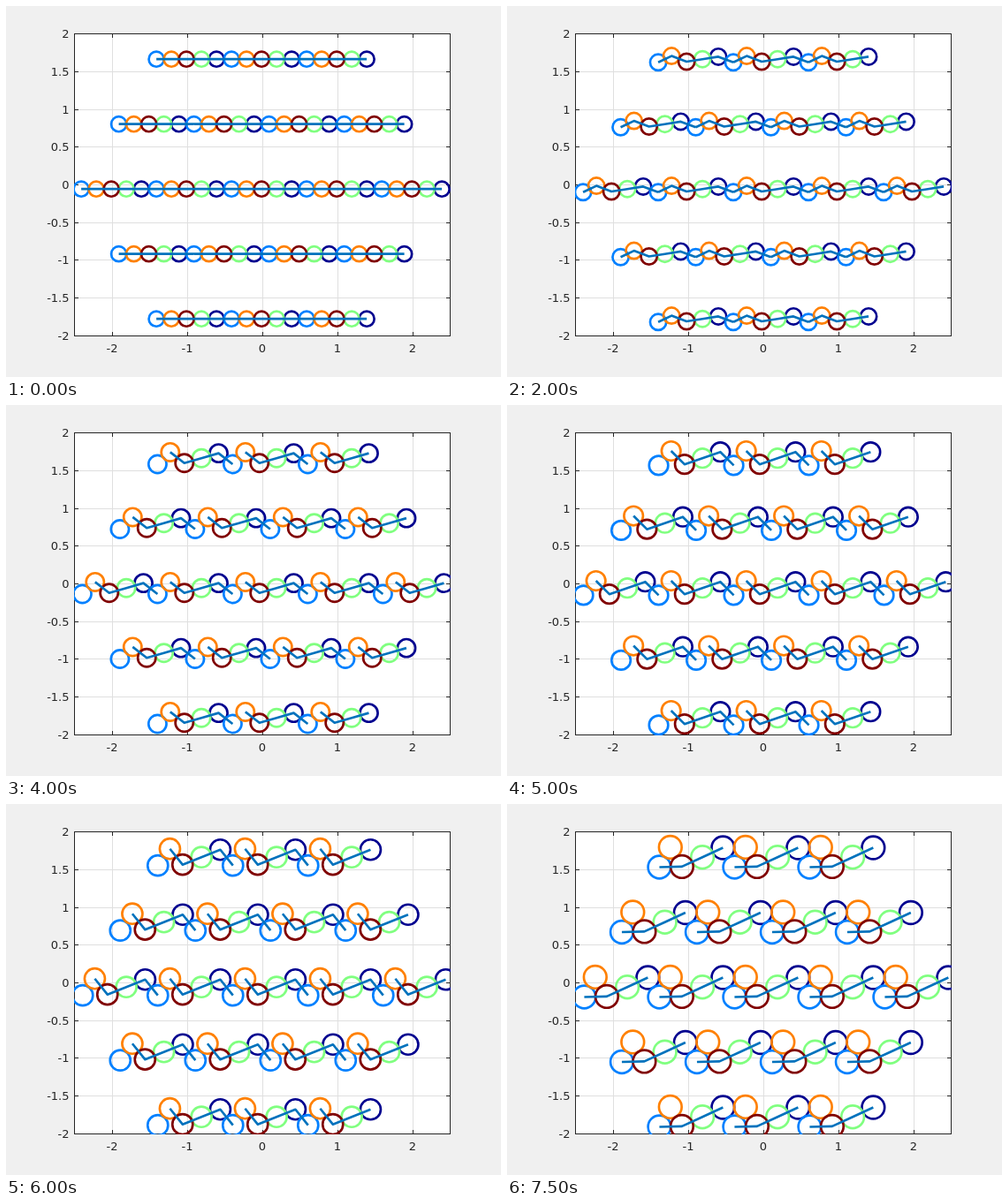
Animation, 560 px wide and 420 px high, one loop 8 s. Source, as an HTML page:

```html
<!DOCTYPE html>
<html lang="en">
<head>
<meta charset="utf-8">
<title>Swelling disk chains</title>
<style>
  html, body { margin: 0; width: 100%; height: 100%; overflow: hidden; background: #f0f0f0; }
  svg { display: block; width: 560px; height: 420px; }
  text { font: 13px "DejaVu Sans", sans-serif; fill: #262626; }
</style>
</head>
<body>
<svg id="stage" viewBox="0 0 560 420">
  <defs>
    <clipPath id="plot"><rect x="77" y="31" width="426" height="343"/></clipPath>
  </defs>
  <rect width="560" height="420" fill="#f0f0f0"/>
  <rect x="77.5" y="31.5" width="425" height="342" fill="#fff"/>
  <g id="axes" fill="none"></g>
  <g clip-path="url(#plot)" fill="none" stroke-width="2.67">
    <g id="disks"></g>
    <path id="links" stroke="#0072bd" stroke-linejoin="round"/>
  </g>
</svg>
<script>
const STEP = 500, STEPS = 16, CELL = 85;
const ROW_CELLS = [3, 4, 5, 4, 3];
// Listed in painting order.
const COLORS = {
  navy: '#00008f', blue: '#0080ff', green: '#80ff80', orange: '#ff8000', red: '#800000'
};
const byId = id => document.getElementById(id);

function add(parent, tag, attrs, label) {
  const node = document.createElementNS('http://www.w3.org/2000/svg', tag);
  for (const name in attrs) node.setAttribute(name, attrs[name]);
  if (label !== undefined) node.textContent = label;
  parent.appendChild(node);
  return node;
}

function drawAxes() {
  const axes = byId('axes');
  let grid = '', ticks = '';
  for (let v = -2; v <= 2; v++) {
    const x = 290 + v * 85 + 0.5;
    grid += `M${x} 32V373`;
    ticks += `M${x} 373v-4M${x} 32v4`;
    add(axes, 'text', { x: x - 0.5, y: 392, 'text-anchor': 'middle' }, v);
  }
  for (let v = -2; v <= 2; v += 0.5) {
    const y = Math.floor(202.5 - v * 85.4) + 0.5;
    grid += `M78 ${y}H502`;
    ticks += `M78 ${y}h4M502 ${y}h-4`;
    add(axes, 'text', { x: 71.5, y: y + 4.5, 'text-anchor': 'end' }, v);
  }
  add(axes, 'path', { d: grid, stroke: '#dfdfdf' });
  add(axes, 'path', { d: ticks, stroke: '#262626' });
  add(axes, 'rect', { x: 77.5, y: 31.5, width: 425, height: 342, stroke: '#262626' });
}

const cells = [];
ROW_CELLS.forEach((count, row) => {
  for (let i = 0; i < count; i++) {
    cells.push({
      x: 290.6 + (i - count / 2) * CELL + 58 - 0.5 * CELL + 42.5,
      y: 60.2 + 73.5 * row,
      last: i === count - 1
    });
  }
});
// Green disk sits 0.685 cells into the chain.
cells.forEach(cell => { cell.x -= 0.0; });

const disks = [];
for (const name in COLORS) {
  for (const cell of cells) {
    disks.push({ name, cell, node: add(byId('disks'), 'circle', { stroke: COLORS[name] }) });
  }
}

const polar = (from, length, degrees) => {
  const a = degrees * Math.PI / 180;
  return { x: from.x + length * Math.cos(a), y: from.y + length * Math.sin(a) };
};

// Disk centres relative to the green one; neighbours stay in touch as they swell.
function pose(k) {
  const size = 17 + 0.19 * k + 0.0255 * k * k;
  const tilt = (2.4 - 0.05 * k) * k;
  const fold = (5.6 - 0.11 * k) * k;
  const green = { x: 0, y: 0 };
  const navy = polar(green, size, -tilt);
  const red = polar(green, -size, -tilt);
  const orange = polar(red, -size, fold);
  const blue = polar({ x: navy.x - CELL, y: navy.y }, size, fold);
  return { size, at: { navy, blue, green, orange, red } };
}

function chain(k) {
  if (k >= 15) return ['blue', 'red', 'green', 'navy'];
  if (k >= 5) return ['orange', 'red', 'green', 'navy'];
  return ['blue', 'orange', 'red', 'green', 'navy'];
}

function render(k) {
  const { size, at } = pose(k);
  for (const { name, cell, node } of disks) {
    node.setAttribute('cx', cell.x + at[name].x);
    node.setAttribute('cy', cell.y + at[name].y);
    node.setAttribute('r', size / 2 + 0.05);
  }
  const names = chain(k);
  let d = '';
  for (const cell of cells) {
    const points = names.map(name => [cell.x + at[name].x, cell.y + at[name].y]);
    if (k < 15 && !cell.last) {
      points.push([cell.x + CELL + at.blue.x, cell.y + at.blue.y]);
    }
    d += 'M' + points.map(p => p.map(n => n.toFixed(2)).join(' ')).join('L');
  }
  byId('links').setAttribute('d', d);
}

function frame(now) {
  render(Math.floor(now / STEP) % STEPS);
  requestAnimationFrame(frame);
}

drawAxes();
render(0);
requestAnimationFrame(frame);
</script>
</body>
</html>
```
